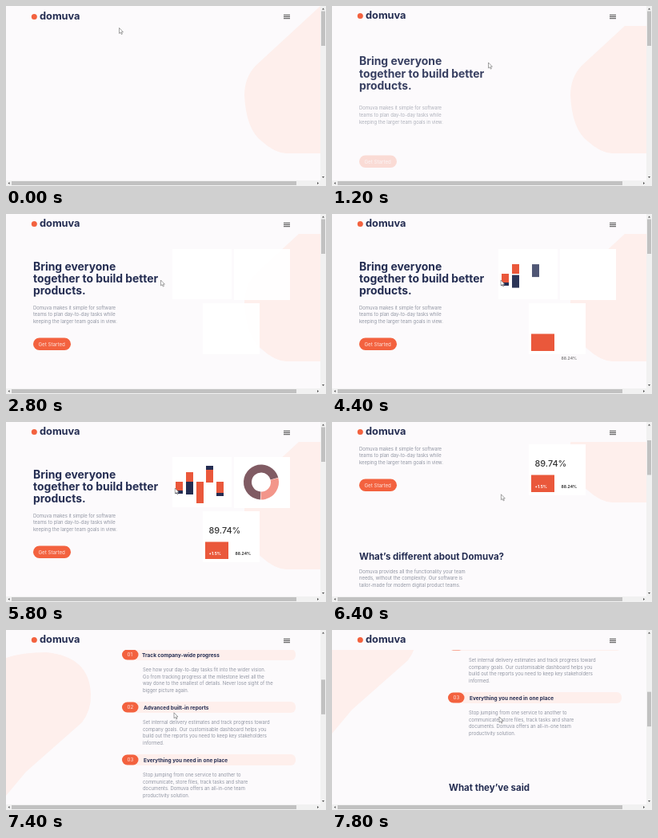
An HTML page that plays this animation: 400x226 px, repeating every 8000 ms.

```html
<!DOCTYPE html>
<html lang="en">
<head>
<meta charset="utf-8">
<title>Landing page</title>
<style>
  html, body { margin: 0; width: 100%; height: 100%; overflow: hidden; background: #fcfafc; }
  svg { display: block; width: 100%; height: 100%; font-family: Inter, sans-serif; }
  .logo { font-size: 12.8px; font-weight: 700; fill: #242d52; }
  .hero { font-size: 13.9px; font-weight: 700; fill: #242d52; }
  .title { font-size: 11.5px; font-weight: 700; fill: #242d52; }
  .item { font-size: 6.5px; font-weight: 700; fill: #242d52; }
  .copy { font-size: 5.9px; fill: #9095a2; }
  .label { font-size: 6.2px; fill: #fde4de; }
  .total { font-size: 10.8px; font-weight: 500; fill: #333; }
  .small { font-size: 5px; font-weight: 700; fill: #333; }
  .gain { font-size: 5px; font-weight: 700; fill: #fff; }
  .blush { fill: #feefec; }
  .orange { fill: #ea583b; }
  .coral { fill: #f3623f; }
  .navy { fill: #242d52; }
  .thumb { fill: #c1c1c1; }
</style>
</head>
<body>
<svg id="stage" viewBox="0 0 400 226" preserveAspectRatio="none"></svg>
<script>
const LOOP = 8000, TICK = 200, SLIDE = 40;

const rect = (x, y, w, h, cls, r = 0) =>
  `<rect class="${cls}" x="${x}" y="${y}" width="${w}" height="${h}" rx="${r}"/>`;
const text = (x, y, cls, lines, step = 0) => lines.map((line, i) =>
  `<text class="${cls}" x="${x}" y="${y + i * step}">${line}</text>`).join('');
const reveal = (start, content, slide = SLIDE) =>
  `<g data-start="${start}" data-slide="${slide}">${content}</g>`;

// x, y, height, colour, start
const bars = [
  [225, 75, 16, 'navy', 3600], [212, 84, 6, 'navy', 3200],
  [250, 55, 16, 'navy', 3850], [263, 86, 7, 'navy', 4500],
  [212, 75, 11, 'orange', 3000], [225, 63, 12, 'orange', 3300],
  [238, 75, 27, 'orange', 4400], [250, 60, 16, 'orange', 4450],
  [263, 75, 14, 'orange', 4550]
];

const items = [
  ['01', 170, 'Track company-wide progress', [
    'See how your day-to-day tasks fit into the wider vision.',
    'Go from tracking progress at the milestone level all the',
    'way done to the smallest of details. Never lose sight of the',
    'bigger picture again.']],
  ['02', 172, 'Advanced built-in reports', [
    'Set internal delivery estimates and track progress toward',
    'company goals. Our customisable dashboard helps you',
    'build out the reports you need to keep key stakeholders',
    'informed.']],
  ['03', 172, 'Everything you need in one place', [
    'Stop jumping from one service to another to',
    'communicate, store files, track tasks and share',
    'documents. Domuva offers an all-in-one team',
    'productivity solution.']]
];

const item = ([number, x, title, copy], i) => {
  const y = 316 + i * 66;
  return rect(150, y - 7, 212, 14, 'blush', 6)
    + rect(145, y - 6.5, 20.5, 13, 'coral', 6.5)
    + text(151.5, y + 2.2, 'label', [number])
    + text(x, y + 2.8, 'item', [title])
    + text(171, y + 21, 'copy', copy, 8.7);
};

const arc = (color, length, turn) =>
  `<circle cx="319" cy="75.5" r="17" fill="none" stroke="${color}" stroke-width="10"
    pathLength="360" stroke-dasharray="${length} 360" transform="rotate(${turn} 319 75.5)"/>`;

const hero =
  reveal(500, text(34, 70.8, 'hero', ['Bring everyone', 'together to build better', 'products.'], 15.2))
  + reveal(720, text(34, 119.5, 'copy', [
    'Domuva makes it simple for software',
    'teams to plan day-to-day tasks while',
    'keeping the larger team goals in view.'], 8.7))
  + reveal(1095, rect(34, 155.5, 47, 15.5, 'coral', 7.75) + text(40.5, 165.5, 'label', ['Get Started']));

const charts =
  reveal(2000, '<path fill="#fff" d="M208 44h74v63h-74zM285 44h70v64h-70zM246 112h71v64h-71z"/>', 0)
  + bars.map(([x, y, h, cls, start]) => reveal(start, rect(x, y, 9, h, cls))).join('')
  + reveal(4700, arc('#805b63', 252, 93) + arc('#f3968a', 105, -13.5), 0)
  + reveal(3200, rect(249, 150.5, 29, 21.5, 'orange'))
  + reveal(4040, text(286.5, 167, 'small', ['88.24%']))
  + reveal(4600, text(253.5, 139.8, 'total', ['89.74%']))
  + reveal(4700, text(253.5, 167, 'gain', ['+1.5%']));

const sections =
  '<path class="blush" d="M0 320Q20 313 50 313Q104 318 106 365Q107 385 95 401L25 463L0 493Z"/>'
  + text(34, 256.9, 'title', ['What’s different about Domuva?'])
  + text(34, 273.5, 'copy', [
    'Domuva provides all the functionality your team',
    'needs, without the complexity. Our software is',
    'tailor-made for modern digital product teams.'], 8.7)
  + items.map(item).join('')
  + text(146, 565.2, 'title', ['What they’ve said']);

document.getElementById('stage').innerHTML = `
  <rect width="400" height="226" fill="#fcfafc"/>
  <g id="page">
    <path class="blush" d="M393 0L312 75Q298 90 298 112Q300 155 320 170Q335 184 350 185H393Z"/>
    ${hero}${charts}${sections}
  </g>
  <rect id="bar" width="393" height="25" fill="#fcfafc"/>
  <g id="head">
    <circle class="coral" cx="35.3" cy="12.5" r="3.5"/>
    ${text(42, 16, 'logo', ['domuva'])}
  </g>
  <path d="M347 11.3h8m-8 2.2h8m-8 2.2h8" stroke="#444" stroke-width="1"/>
  <path d="M393 0h7v226H0v-7h393z" fill="#f1f1f1"/>
  ${rect(7, 220, 356, 5, 'thumb')}
  <rect id="thumb" class="thumb" x="394" y="6.5" width="5" height="43.5"/>
  <path d="M395 4.5l1.5-2 1.5 2zM395 214l1.5 2 1.5-2zM4.5 221l-2 1.5 2 1.5zM389 221l2 1.5-2 1.5z" fill="#505050"/>
  <path id="pointer" d="M0 0v7l1.6-1.4 1.2 2.5 1.1-.5-1.1-2.4h2.1z" fill="#fff" stroke="#666" stroke-width=".6"/>`;

const $ = id => document.getElementById(id);
const reveals = [...document.querySelectorAll('[data-start]')];
const scrollKeys = [[6000, 0], [6800, 168], [7800, 363]];
const pointerX = [[0, 141.5], [1200, 195.5], [2800, 193.5], [4400, 211], [6800, 211.5], [7800, 209]];
const pointerY = [[0, 27.5], [1200, 71], [2800, 83], [5800, 83], [6800, 96], [7800, 109]];

function track(keys, t) {
  const next = keys.findIndex(key => key[0] > t);
  if (next < 0) return keys[keys.length - 1][1];
  if (next === 0) return keys[0][1];
  const [t0, a] = keys[next - 1], [t1, b] = keys[next];
  return a + (b - a) * (t - t0) / (t1 - t0);
}

function draw() {
  const t = Math.floor(performance.now() % LOOP / TICK) * TICK;
  for (const el of reveals) {
    const u = Math.min(1, Math.max(0, (t - el.dataset.start) / 1000));
    const rest = (1 - u) ** 2;
    el.setAttribute('opacity', 1 - rest);
    el.setAttribute('transform', `translate(0 ${el.dataset.slide * rest})`);
  }
  const scroll = track(scrollKeys, t);
  $('page').setAttribute('transform', `translate(0 ${-scroll})`);
  $('thumb').setAttribute('y', 6.5 + scroll * 0.196);
  $('bar').setAttribute('opacity', t < 600 ? 0 : 1);
  $('head').setAttribute('transform', `translate(0 ${t < 600 ? 1 : 0})`);
  $('pointer').setAttribute('transform', `translate(${track(pointerX, t)} ${track(pointerY, t)})`);
  requestAnimationFrame(draw);
}
draw();
</script>
</body>
</html>
```
